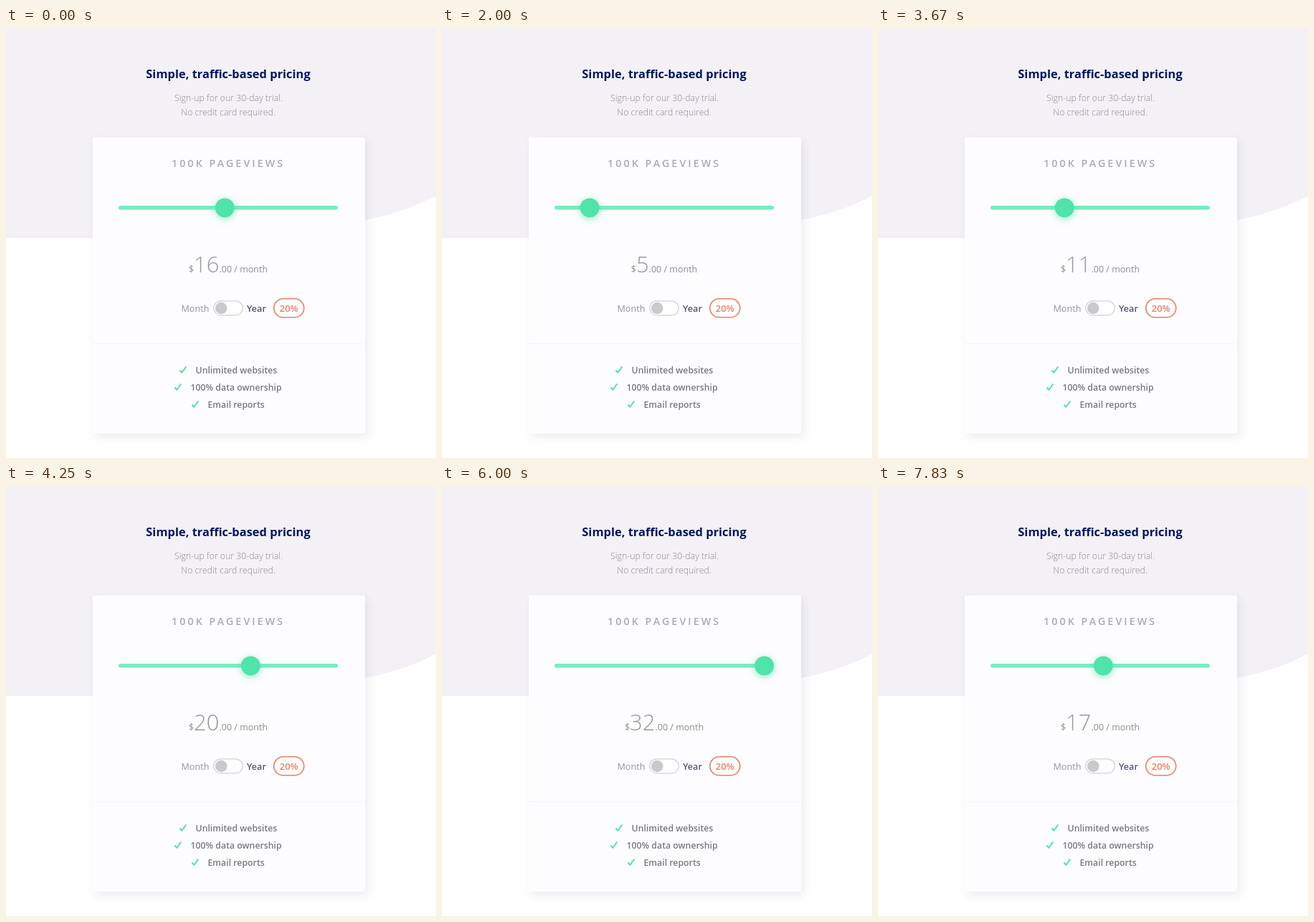
Write an HTML page that moves like this. It is 600x600 px and loops after 8 s.

```html
<!DOCTYPE html>
<html lang="en">
<head>
<meta charset="utf-8">
<title>Pricing slider</title>
<style>
  html, body { margin: 0; width: 100%; height: 100%; overflow: hidden; background: #fefefe; }
  svg { display: block; width: 100%; height: 100%; font-family: "Open Sans", "Noto Sans", sans-serif; }
  .mid { text-anchor: middle; }
  .title { font-size: 16.45px; font-weight: 700; fill: #04175c; }
  .intro { font-size: 12.3px; font-weight: 300; fill: #8d8b92; }
  .views { font-size: 14.3px; font-weight: 600; letter-spacing: 3.05px; fill: #adabb0; }
  .price { font-size: 12.5px; fill: #8f8d93; }
  .amount { font-size: 31px; font-weight: 300; fill: #9a989e; }
  .month { font-size: 12.6px; fill: #959399; }
  .year { font-size: 12.6px; font-weight: 600; fill: #5a5470; }
  .sale { font-size: 13px; font-weight: 600; fill: #ea8265; }
  .list { font-size: 12.3px; font-weight: 600; fill: #7b797f; }
  .check { fill: none; stroke: #50e3ab; stroke-width: 2; stroke-linejoin: round; }
  .card { filter: drop-shadow(4px 5px 6px rgba(40, 30, 60, .07)); }
  #thumb { filter: drop-shadow(0 2px 5px rgba(80, 227, 171, .65)); }
</style>
</head>
<body>
<svg viewBox="0 0 600 600">
  <path d="M0 0H600V234Q558 257 500 268V293H0Z" fill="#f3f0f6"/>

  <text class="title mid" x="310" y="69.5">Simple, traffic-based pricing</text>
  <text class="intro mid" x="310.5" y="101.5">Sign-up for our 30-day trial.</text>
  <text class="intro mid" x="310" y="122.3">No credit card required.</text>

  <rect class="card" x="121" y="152.5" width="380" height="413.5" rx="2" fill="#fdfcfe"/>
  <path d="M121 440.5H501" stroke="#f6f4f8"/>

  <text class="views" x="231" y="194.3">100K PAGEVIEWS</text>

  <rect x="157" y="248" width="306" height="5.5" rx="2.75" fill="#76edbf"/>
  <circle id="thumb" cy="250.8" r="13.4" fill="#50e3ab"/>

  <text class="price mid" x="310" y="340.5">$<tspan class="amount" id="amount">16</tspan>.00 / month</text>

  <text class="month" x="244.5" y="395.5">Month</text>
  <rect x="289.8" y="380.8" width="40.6" height="20" rx="10" fill="#fefefe" stroke="#d4d2d7" stroke-width="1.2"/>
  <circle cx="300.3" cy="391" r="8.3" fill="#cbc9cd"/>
  <text class="year" x="336" y="395.5">Year</text>
  <rect x="373.8" y="377.8" width="42" height="26" rx="13" fill="none" stroke="#ea8265" stroke-width="1.6"/>
  <text class="sale mid" x="394.8" y="395.7">20%</text>

  <g class="list">
    <text x="264.5" y="481.5">Unlimited websites</text>
    <text x="257.5" y="505.5">100% data ownership</text>
    <text x="281.5" y="529.5">Email reports</text>
  </g>
  <g class="check">
    <path d="M242.5 477.5l3 3.3l5.8-8.3"/>
    <path d="M235.5 501.5l3 3.3l5.8-8.3"/>
    <path d="M259.5 525.5l3 3.3l5.8-8.3"/>
  </g>
</svg>
<script>
  const LOOP = 8000;
  const TICK = 1000 / 12;
  const MAX_PRICE = 32;
  const LEFT = 170, RIGHT = 449.7;

  // [tick, price]: the slider is dragged between these stops
  const STOPS = [
    [0, 16], [4, 16], [5, 15], [14, 11], [15, 11], [16, 10], [19, 8], [21, 8],
    [22, 7], [24, 5], [25, 5], [26, 4], [35, 1], [36, 2], [44, 11], [45, 13],
    [55, 25], [58, 25], [65, 29], [66, 30], [70, 32], [76, 32], [77, 31],
    [86, 19], [90, 19], [94, 17], [96, 17]
  ];

  const thumb = document.getElementById('thumb');
  const amount = document.getElementById('amount');

  function priceAt(tick) {
    const next = STOPS.findIndex(([at]) => at > tick);
    if (next < 0) return STOPS[STOPS.length - 1][1];
    const [t0, p0] = STOPS[next - 1];
    const [t1, p1] = STOPS[next];
    return Math.round(p0 + (p1 - p0) * (tick - t0) / (t1 - t0));
  }

  let shown;
  function draw(now) {
    // small lead keeps rounded times on the right side of a tick
    const price = priceAt(Math.floor((now % LOOP + 4) / TICK));
    if (price !== shown) {
      shown = price;
      thumb.setAttribute('cx', LEFT + (RIGHT - LEFT) * (price - 1) / (MAX_PRICE - 1));
      amount.textContent = price;
    }
  }

  const start = performance.now();
  function loop() {
    draw(performance.now() - start);
    requestAnimationFrame(loop);
  }
  loop();
</script>
</body>
</html>
```
